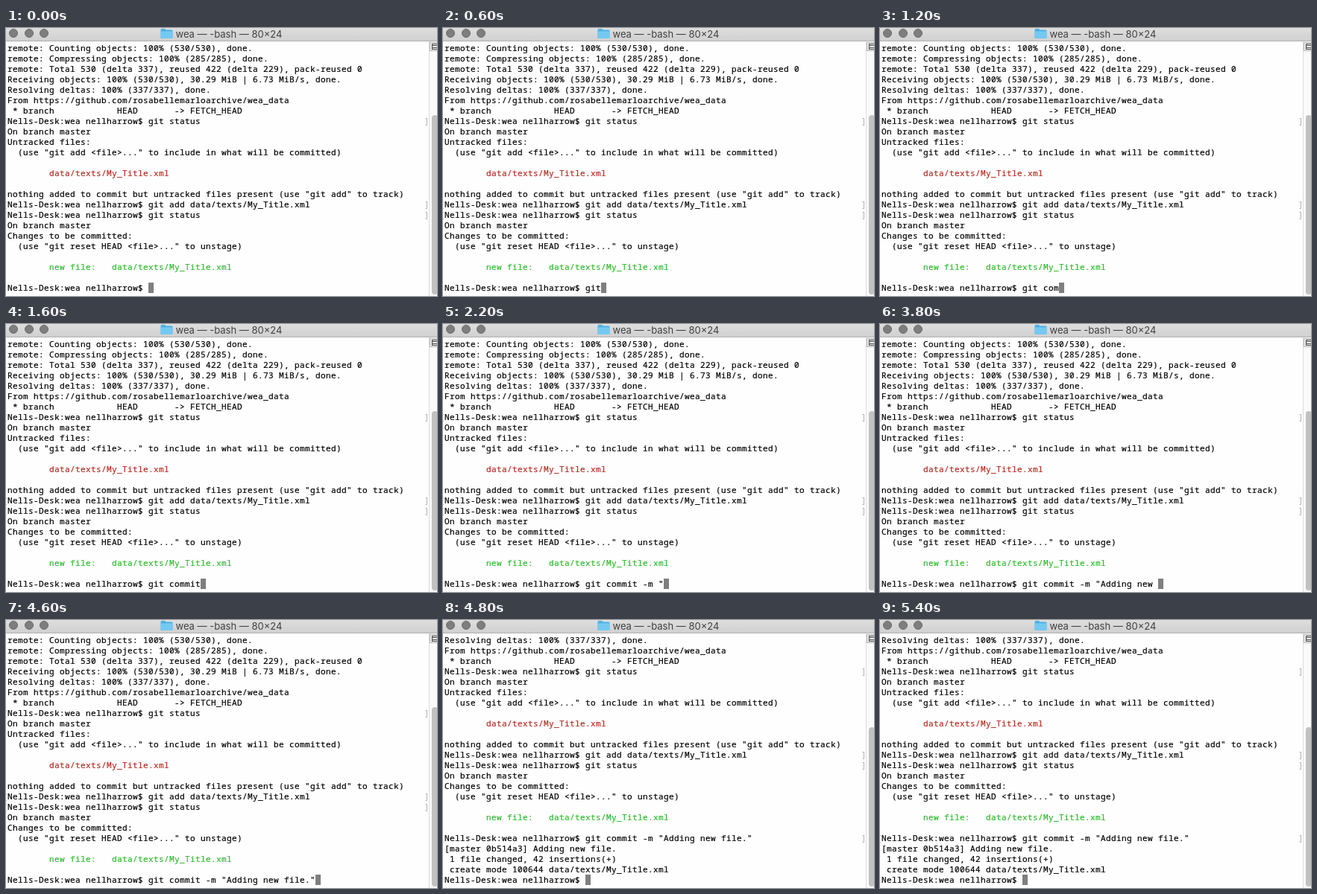
An HTML page for the animation above (5.6 s loop, 578x360 px).

```html
<!DOCTYPE html>
<html lang="en">
<head>
<meta charset="utf-8">
<title>Terminal</title>
<style>
  html, body { margin: 0; width: 100%; height: 100%; overflow: hidden; background: #fff; }
  #stage { position: relative; width: 578px; height: 360px; overflow: hidden; background: #fefefe; }
  #view { position: absolute; left: 0; top: 20px; width: 567px; height: 336px; overflow: hidden; }
  #lines { position: absolute; left: 0; top: 0; width: 567px; }
  .line {
    position: relative; height: 14px; padding-left: 2px; white-space: pre; color: #000;
    font: 500 11px/14px "Noto Sans Mono", "DejaVu Sans Mono", monospace;
    letter-spacing: .4px; font-variant-ligatures: none;
    -webkit-text-stroke: .2px currentColor;
  }
  .red { color: #b52a20; }
  .green { color: #2dbb2b; }
  .mark::before, .mark::after { position: absolute; top: 0; color: #aaa; -webkit-text-stroke: 0; }
  .mark::before { content: "["; left: -4px; }
  .mark::after { content: "]"; left: 561px; }
  #cursor { position: absolute; top: 322px; width: 7px; height: 14px; background: #7f7f7f; }
  #bar {
    position: absolute; left: 0; top: 0; width: 578px; height: 17px;
    background: linear-gradient(#dedede, #d0d0d0); border-bottom: 1px solid #b1b1b1;
  }
  .dot {
    position: absolute; top: 1px; width: 10px; height: 10px; border-radius: 50%;
    background: #7e7e7e; border: 1px solid #6c6c6c;
  }
  #name {
    position: absolute; left: 227.5px; top: 0; white-space: pre; color: #404040;
    font: 13px/16px Inter, Roboto, sans-serif;
  }
  #bar svg { position: absolute; left: 207px; top: 0; }
  #track {
    position: absolute; left: 567px; top: 18px; width: 10px; height: 342px;
    background: #fafafa; border-left: 1px solid #dcdcdc;
  }
  #split {
    position: absolute; left: 0; top: 1px; width: 12px; height: 12px;
    background: #eee; border: 1px solid #b5b5b5; box-sizing: border-box;
  }
  #split::before {
    content: ""; position: absolute; left: 2px; top: 1px; width: 8px; height: 6px; border: 1px solid #444;
    background: linear-gradient(#fff 1px, #444 1px 2px, #fff 2px 4px, #444 4px 5px, #fff 5px);
  }
  #thumb { position: absolute; left: 3px; bottom: 2px; width: 8px; border-radius: 4px; background: #c1c1c1; }
</style>
</head>
<body>
<div id="stage">
  <div id="view"><div id="lines"></div><div id="cursor"></div></div>
  <div id="track"><div id="split"></div><div id="thumb"></div></div>
  <div id="bar">
    <div class="dot" style="left:4px"></div>
    <div class="dot" style="left:25px"></div>
    <div class="dot" style="left:45px"></div>
    <svg width="17" height="15">
      <path d="M.5 2.5q0-1.500 1.500-1.500h4l1.500 1.500h7.500q1.500 0 1.500 1.500v8.500q0 1.500-1.500 1.500h-13q-1.500 0-1.500-1.500z" fill="#4fb0e2"/>
      <path d="M.5 4.500h16v8q0 1.500-1.500 1.500h-13q-1.500 0-1.500-1.500z" fill="#74c9f2"/>
    </svg>
    <div id="name">wea — -bash — 80×24</div>
  </div>
</div>
<script>
const $ = id => document.getElementById(id);
const PROMPT = "Nells-Desk:wea nellharrow$ ";
const COMMAND = 'git commit -m "Adding new file."';
const CELL = 7, ROW = 14, STEP = 200, LOOP = 5600, ENTER = 4800;
const COMMIT_ROW = 23;

// characters typed at each 200 ms step
const TYPED = [0, 1, 2, 3, 5, 6, 7, 7, 9, 10, 12, 15, 16, 16, 18, 20, 22, 22, 24, 26, 27, 29, 32];
TYPED.splice(7, 9, 8, 10, 11, 13, 15, 16, 18, 20, 22);

const cmd = text => [PROMPT + text, "mark"];
const screen = [
  "remote: Counting objects: 100% (530/530), done.",
  "remote: Compressing objects: 100% (285/285), done.",
  "remote: Total 530 (delta 337), reused 422 (delta 229), pack-reused 0",
  "Receiving objects: 100% (530/530), 30.29 MiB | 6.73 MiB/s, done.",
  "Resolving deltas: 100% (337/337), done.",
  "From https://github.com/rosabellemarloarchive/wea_data",
  " * branch            HEAD       -> FETCH_HEAD",
  cmd("git status"),
  "On branch master",
  "Untracked files:",
  '  (use "git add <file>..." to include in what will be committed)',
  "",
  ["        data/texts/My_Title.xml", "red"],
  "",
  'nothing added to commit but untracked files present (use "git add" to track)',
  cmd("git add data/texts/My_Title.xml"),
  cmd("git status"),
  "On branch master",
  "Changes to be committed:",
  '  (use "git reset HEAD <file>..." to unstage)',
  "",
  ["        new file:   data/texts/My_Title.xml", "green"],
  "",
  PROMPT,
  "[master 0b514a3] Adding new file.",
  " 1 file changed, 42 insertions(+)",
  " create mode 100644 data/texts/My_Title.xml",
  PROMPT
];

const rows = screen.map(item => {
  const [text, kind = ""] = [].concat(item);
  const row = document.createElement("div");
  row.className = "line " + kind;
  row.textContent = text;
  $("lines").append(row);
  return row;
});

let shown = -1;
function draw(now) {
  const step = Math.floor((now % LOOP) / STEP);
  if (step !== shown) {
    shown = step;
    const done = step * STEP >= ENTER;
    const count = TYPED[Math.min(step, TYPED.length - 1)];
    const commit = rows[COMMIT_ROW];
    commit.textContent = PROMPT + COMMAND.slice(0, count);
    commit.classList.toggle("mark", done);
    $("lines").style.top = (done ? -4 * ROW : 0) + "px";
    $("cursor").style.left = 2 + (PROMPT.length + (done ? 0 : count)) * CELL + "px";
    $("thumb").style.top = (done ? 126 : 99) + "px";
  }
}

const start = performance.now();
function tick() {
  draw(performance.now() - start);
  requestAnimationFrame(tick);
}
tick();
</script>
</body>
</html>
```
